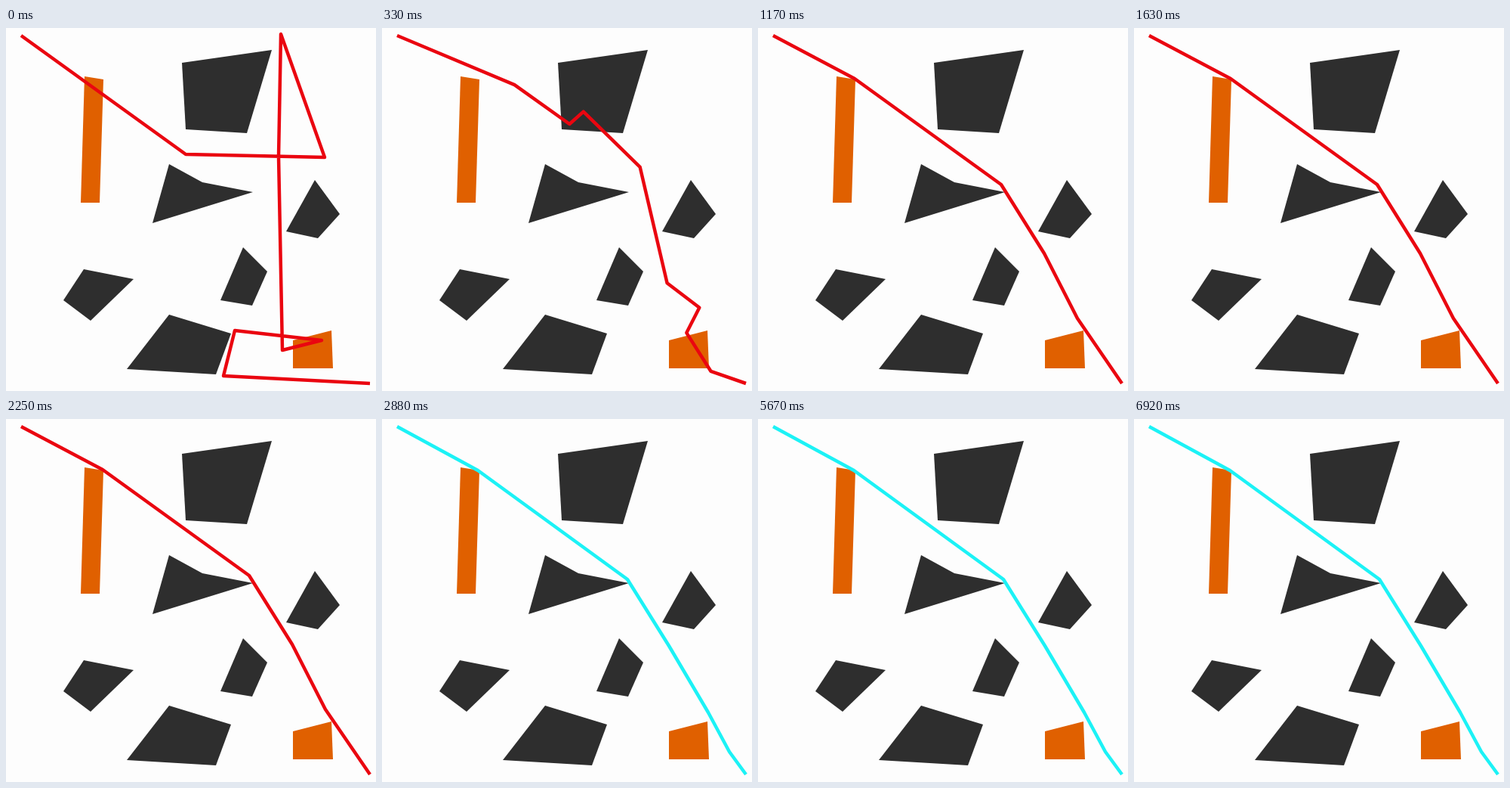
These frames come from a looping animation (490x480 px, 6960 ms). An HTML page:

```html
<!DOCTYPE html>
<html lang="en">
<head>
<meta charset="utf-8">
<title>Path planning</title>
<style>
  html, body { margin: 0; width: 100%; height: 100%; overflow: hidden; background: #fdfdfd; }
  svg { display: block; width: 490px; height: 480px; }
</style>
</head>
<body>
<svg viewBox="0 0 490 480">
  <g fill="#2e2e2e">
    <path d="M233 46 352 29 319 139 238 134Z"/>
    <path d="M216 180 260 204 327 217 194 258Z"/>
    <path d="M409 201 442 246 413 278 371 269Z"/>
    <path d="M314 290 346 322 326 367 284 360Z"/>
    <path d="M103 319 169 332 112 387 76 360Z"/>
    <path d="M216 379 298 404 278 458 160 451Z"/>
  </g>
  <g fill="#e06000">
    <path d="M104 64 129 68 124 231 99 231Z"/>
    <path d="M380 413 431 400 433 450 380 450Z"/>
  </g>
  <polyline id="route" fill="none" stroke-width="4.5" stroke-linejoin="round"/>
</svg>
<script>
const LOOP = 6960, STEPS = 167;
const REPAIRED = 750, SETTLED = 1170, SOLVED = 2790;

const toPoints = text => `20,10 ${text} 482,470`.split(" ").map(p => p.split(",").map(Number));
const easeOut = u => 1 - (1 - u) ** 3;
const blend = (a, b, u) => a.map((v, k) => v + (b[k] - v) * u);
const morph = (from, to, u) => from.map((p, i) => blend(p, to[i], easeOut(u)));

// Adds a midpoint to every leg but the last.
const subdivide = points => points.flatMap((p, i) =>
  i < points.length - 2 ? [p, blend(p, points[i + 1], 0.5)] : [p]);

const initial = toPoints("238,167 422,171 364,8 361,170 366,426 418,413 303,400 288,460");
const repaired = toPoints("157,48 197,114 238,141 336,188 381,311 421,357 433,404 479,452");
const settled = subdivide(toPoints("128,67 322,207 379,298 423,384"));
const solution = toPoints("127,68 325,212 380,300 432,388 460,440");
const route = document.getElementById("route");

function routeAt(time) {
  if (time >= SOLVED) return solution;
  if (time >= SETTLED) return settled;
  if (time >= REPAIRED) return morph(repaired, settled, (time - REPAIRED) / (SETTLED - REPAIRED));
  return morph(initial, repaired, time / REPAIRED);
}

function draw(elapsed) {
  const step = Math.floor((elapsed % LOOP) / LOOP * STEPS + 0.05);
  const time = step * LOOP / STEPS;
  route.setAttribute("points", routeAt(time).join(" "));
  route.setAttribute("stroke", time >= SOLVED ? "#1cf2f6" : "#ea0610");
}

const began = performance.now();
function tick() {
  draw(performance.now() - began);
  requestAnimationFrame(tick);
}
tick();
</script>
</body>
</html>
```
